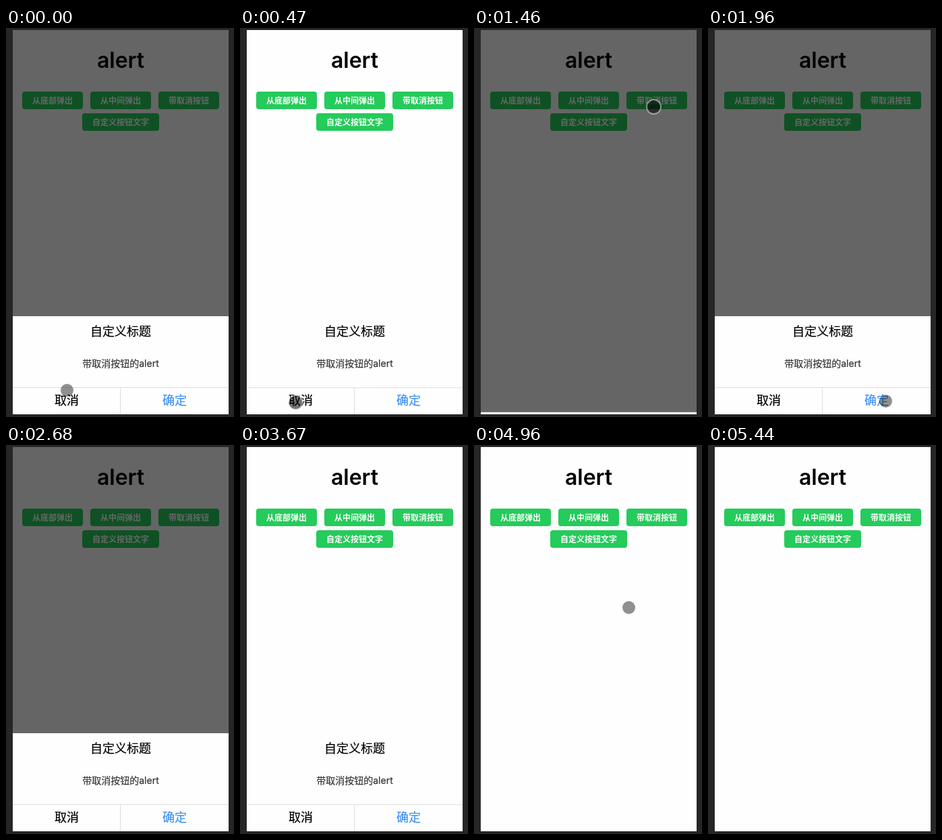
Recreate the animation shown at these times as an HTML page. Size 338x575 px, loop 5950 ms.

```html
<!DOCTYPE html>
<html lang="zh-CN">
<head>
<meta charset="utf-8">
<title>alert</title>
<style>
  html, body { margin: 0; width: 100%; height: 100%; overflow: hidden; background: #262626; }
  svg { display: block; width: 338px; height: 575px; }
  text { font-family: Inter, "Noto Sans CJK SC", "Noto Sans CJK", sans-serif; text-anchor: middle; }
  .title { font-size: 32px; font-weight: 600; }
  .button rect { fill: #25cb5b; }
  .button text { fill: #fff; font-size: 12px; font-weight: 700; }
  .sheet-text { stroke: currentColor; stroke-width: .2; fill: currentColor; }
  .large { font-size: 18px; }
  .body { font-size: 14px; color: #333; }
  .confirm { color: #3c8ff2; }
</style>
</head>
<body>
<svg viewBox="0 0 338 575">
  <defs><clipPath id="screen"><rect x="10" y="3" width="320" height="568"/></clipPath></defs>
  <rect width="338" height="575" fill="#262626"/>
  <g clip-path="url(#screen)">
    <rect x="10" y="3" width="320" height="568" fill="#fefefe"/>
    <text class="title" x="170" y="58.5">alert</text>
    <g id="buttons"></g>
    <rect id="mask" x="10" y="3" width="320" height="568" fill-opacity=".6"/>
    <g id="sheet">
      <rect x="10" y="426" width="320" height="145" fill="#fefefe"/>
      <text class="sheet-text large" x="170" y="455">自定义标题</text>
      <text class="sheet-text body" x="170" y="501">带取消按钮的alert</text>
      <path d="M10 531.5H330M169.5 532V571" stroke="#dedede"/>
      <text class="sheet-text large" x="90" y="557">取消</text>
      <text class="sheet-text large confirm" x="250" y="557">确定</text>
    </g>
  </g>
  <circle id="pointer" stroke-width="2"/>
</svg>
<script>
const LOOP = 5950;
const SHEET_HEIGHT = 145;
const SLIDE = 300;
const byId = id => document.getElementById(id);
const mask = byId('mask'), sheet = byId('sheet'), pointer = byId('pointer');

// Rows of buttons, centred, each as wide as its label plus padding.
function buildButtons(rows) {
  const gap = 11, width = label => label.length * 12 + 30;
  return rows.map((labels, row) => {
    const total = labels.reduce((sum, label) => sum + width(label) + gap, -gap);
    const y = 94 + row * 32;
    let x = 170 - total / 2;
    return labels.map(label => {
      const w = width(label), left = x;
      x += w + gap;
      return `<g class="button"><rect x="${left}" y="${y}" width="${w}" height="26" rx="4"/>` +
        `<text x="${left + w / 2}" y="${y + 17.5}">${label}</text></g>`;
    }).join('');
  }).join('');
}
byId('buttons').innerHTML = buildButtons([
  ['从底部弹出', '从中间弹出', '带取消按钮'],
  ['自定义按钮文字']
]);

const place = (x, y) => ({ x, y });
const start = place(90.5, 535.5);
const moves = [
  { from: 20, to: 170, end: place(82.5, 553.5) },
  { from: 530, to: 910, end: place(245.5, 194.5) },
  { from: 910, to: 1280, end: place(266.5, 116.5) },
  { from: 1560, to: 1930, end: place(263.5, 551.5) },
  { from: 2590, to: 2650, end: place(272.5, 556.5) },
  { from: 3700, to: 4110, end: place(221.5, 169.5) },
  { from: 4330, to: 4510, end: place(230.5, 241.5) },
  { from: 4960, to: 5170, end: place(25, -12) }
];
const presses = [{ from: 200, to: 500 }, { from: 1310, to: 1530 }];
const away = { from: 2680, to: 3700 };
const openings = [{ from: -SLIDE, to: 470 }, { from: 1450, to: 3670 }, { from: LOOP, to: LOOP + 1 }];

const within = (t, span) => t >= span.from && t < span.to;
const progress = (t, from, duration) => Math.max(0, Math.min(1, (t - from) / duration));
const mix = (a, b, k) => a + (b - a) * k;

// CSS "ease": cubic-bezier(.25, .1, .25, 1)
function ease(p) {
  const bezier = (u, a, b) => 3 * u * (1 - u) ** 2 * a + 3 * u * u * (1 - u) * b + u ** 3;
  let lo = 0, hi = 1;
  for (let i = 0; i < 20; i++) {
    const mid = (lo + hi) / 2;
    if (bezier(mid, .25, .25) < p) lo = mid; else hi = mid;
  }
  return bezier(lo, .1, 1);
}

function pointerAt(t) {
  return moves.reduce((at, move) => {
    const k = progress(t, move.from, move.to - move.from);
    return place(mix(at.x, move.end.x, k), mix(at.y, move.end.y, k));
  }, start);
}

function setAttributes(node, values) {
  for (const name in values) node.setAttribute(name, values[name]);
}

function render(t) {
  const opening = openings.filter(span => span.from <= t).pop();
  const shown = ease(progress(t, opening.from, SLIDE)) - ease(progress(t, opening.to, SLIDE));
  mask.setAttribute('visibility', within(t, opening) ? 'visible' : 'hidden');
  sheet.setAttribute('transform', `translate(0 ${SHEET_HEIGHT * (1 - shown)})`);

  const { x, y } = pointerAt(t);
  const pressed = presses.some(span => within(t, span));
  setAttributes(pointer, {
    cx: x, cy: y,
    r: pressed ? 10.5 : 9.5,
    fill: `rgba(0,0,0,${pressed ? .55 : .43})`,
    stroke: pressed ? 'rgba(255,255,255,.45)' : 'none',
    visibility: within(t, away) ? 'hidden' : 'visible'
  });
}

const origin = performance.now();
function tick() {
  render((performance.now() - origin) % LOOP);
  requestAnimationFrame(tick);
}
render(0);
requestAnimationFrame(tick);
</script>
</body>
</html>
```
